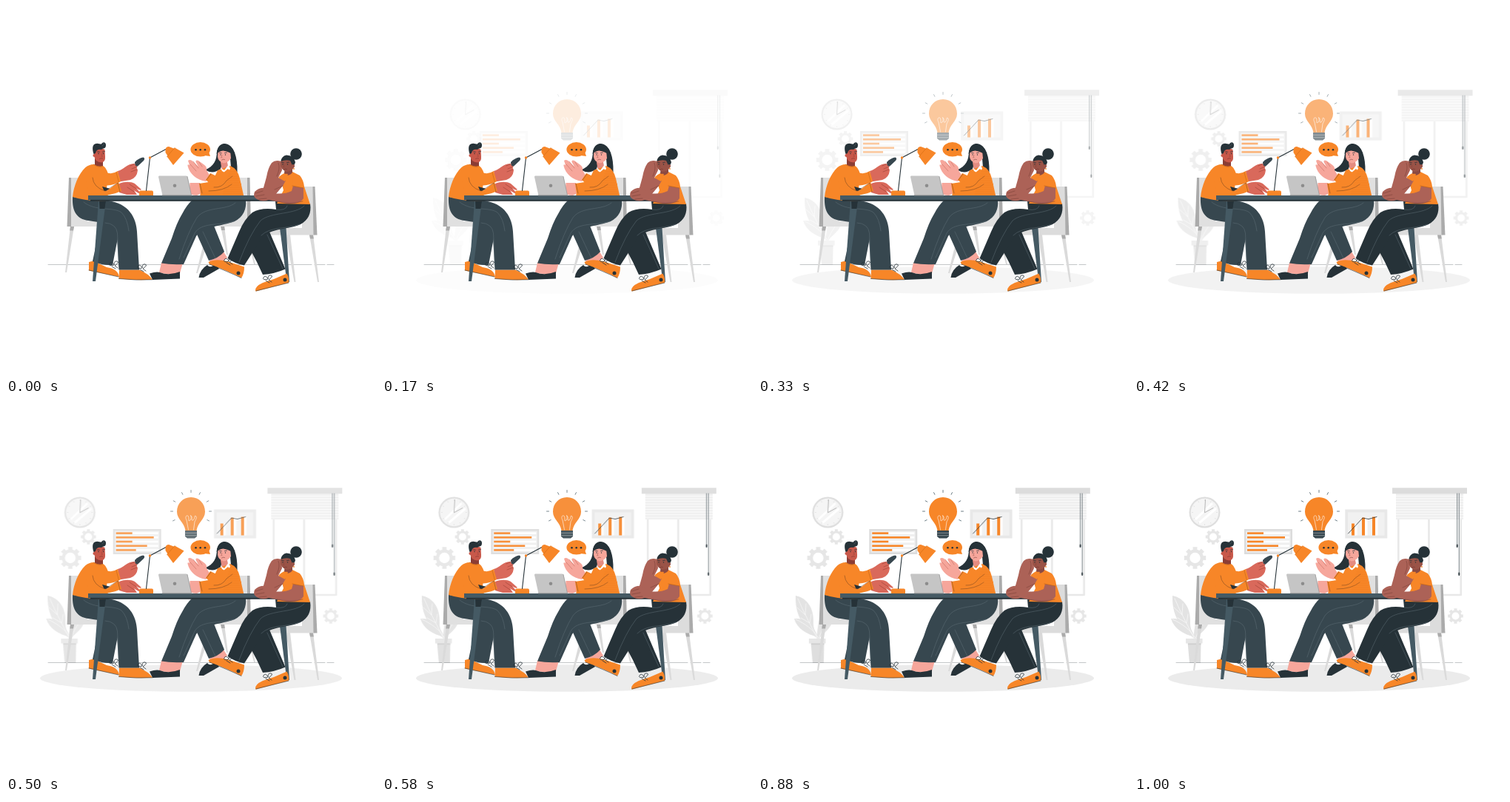
Recreate the animation shown at these times as an HTML page with a canvas. Size 500x500 px, loop 1040 ms.

```html
<!DOCTYPE html>
<html lang="en">
<head>
<meta charset="utf-8">
<title>Team meeting</title>
<style>
html, body { margin: 0; width: 100%; height: 100%; overflow: hidden; background: #fff; }
canvas { display: block; width: 500px; height: 500px; }
</style>
</head>
<body>
<canvas id="stage"></canvas>
<script>
const LOOP = 1040, STEPS = 25, SLIDE = 20, SIZE = 500;
const scale = Math.max(1, window.devicePixelRatio || 1);
const ORANGE = '#f78628', INK = '#263238', SLATE = '#37474f', TABLE = '#455a64', SEAM = '#607078';
const MAN = '#d9695b', MAN_FACE = '#c8584a', PINK = '#f6a69b', BROWN = '#ac6257', BROWN_FACE = '#9a5347';

function setup(cv) {
  cv.width = cv.height = Math.round(SIZE * scale);
  const c = cv.getContext('2d');
  c.scale(scale, scale);
  c.lineCap = c.lineJoin = 'round';
  return c;
}

let g;
function layer(...parts) {
  const cv = document.createElement('canvas');
  g = setup(cv);
  parts.forEach(part => part());
  return cv;
}

function fill(d, color) { g.fillStyle = color; g.fill(new Path2D(d)); }
function line(d, color = INK, w = 0.7) {
  g.strokeStyle = color;
  g.lineWidth = w;
  g.stroke(new Path2D(d));
}
function box(x, y, w, h, color) { g.fillStyle = color; g.fillRect(x, y, w, h); }
function oval(x, y, rx, ry, color) {
  g.fillStyle = color;
  g.beginPath();
  g.ellipse(x, y, rx, ry, 0, 0, 7);
  g.fill();
}
function dot(x, y, r, color) { oval(x, y, r, r, color); }

/* ---------- background ---------- */

function floor() { oval(250, 370.5, 204, 18.3, '#ebebeb'); }

function bulb() {
  fill('M250 126C239 126 231 134.500 231 145.500C231 156 241 160 242.500 171H257.500C259 160 269 156 269 145.500C269 134.500 261 126 250 126Z', ORANGE);
  line('M246.500 170L244 157C241 152 245 149 246.500 152C248 157 245 159 249 157C252 153 248 149 250 151C253 154 249 158 253 157C256 154 254 149 257 152C258 154 256 157 255 159L253.500 170', '#fff', 0.6);
  fill('M242 171H258V179L255 181.500H245L242 179Z', SLATE);
  line('M242 174.300H258M242 177.700H258', '#b0bbc0', 0.6);
  const angles = [-90, -63, -117, -30, -150, 0, 180, 27, 153];
  for (const a of angles) {
    const t = a * Math.PI / 180, x = Math.cos(t), y = Math.sin(t);
    line(`M${250 + x * 24.5} ${145 + y * 25.5}L${250 + x * 27.5} ${145 + y * 28.5}`, TABLE, 0.8);
  }
}

function gear(x, y, r) {
  const teeth = 8;
  g.fillStyle = '#e6e6e6';
  g.beginPath();
  for (let i = 0; i < teeth; i++) {
    const a = i * Math.PI * 2 / teeth;
    for (const [da, k] of [[-0.25, 0.77], [-0.2, 1], [0.2, 1], [0.25, 0.77]]) {
      g.lineTo(x + r * k * Math.cos(a + da), y + r * k * Math.sin(a + da));
    }
  }
  g.closePath();
  g.moveTo(x + r * 0.48, y);
  g.arc(x, y, r * 0.48, 0, 7);
  g.fill('evenodd');
}

function clock() {
  dot(95.5, 146.5, 21, '#dedede');
  dot(95.5, 146.5, 18.8, '#f5f5f5');
  line('M84 155L105 135M89 160L110 142', '#fff', 3);
  for (let i = 0; i < 12; i++) {
    const a = i * Math.PI / 6, x = Math.cos(a), y = Math.sin(a);
    line(`M${95.5 + 16 * x} ${146.5 + 16 * y}L${95.5 + 17 * x} ${146.5 + 17 * y}`, '#d5d5d5', 0.6);
  }
  line('M96.500 129.500L95.500 146.800L107 140.500', '#b5b5b5', 1);
}

function plant() {
  const leaf = '#e3e3e3', vein = '#f8f8f8';
  fill('M52 259C67 262 77 275 76 296C76 303 79 311 82 318C68 303 51 293 52 259Z', leaf);
  fill('M50 290C62 289 76 296 82 315C67 311 54 304 50 290Z', leaf);
  fill('M83 317C82 303 87 291 102 288C103 300 94 306 83 317Z', leaf);
  fill('M81 318C80 301 86 286 91 263C96 285 91 303 84 318Z', leaf);
  line('M55 263C62 280 73 300 82 318M54 275L65 285L66 270M59 289L71 296L73 284M52 291C65 297 75 304 82 315M83 317C87 306 94 295 101 289', vein, 0.8);
  fill('M72.500 322H90.500L90 350H75Z', '#dedede');
  box(70, 317, 22.500, 6.500, '#e6e6e6');
  box(73, 323.500, 17.500, 1.800, '#cfcfcf');
}

function blinds() {
  line('M357.300 155V258H441.800V155M398.500 155V258', '#e8e8e8', 2.6);
  box(354, 121, 91, 35, '#efefef');
  for (let y = 124; y < 156; y += 3.6) box(354, y, 91, 0.7, '#fff');
  box(349, 113.3, 101, 8, '#dcdcdc');
  line('M436.700 121V192M439.300 121V230', '#6c777c', 0.9);
  line('M436.700 190.500V193M439.300 228.500V231', INK, 1.8);
}

function board() {
  box(149, 169, 65, 34, '#dcdcdc');
  box(151.5, 171.5, 60, 29, '#efefef');
  [22, 51, 22, 42, 27].forEach((w, i) => {
    const y = 173.3 + i * 5.7;
    box(153, y, 57, 2.6, '#fff');
    box(153, y, w, 2.6, ORANGE);
  });
}

function chart() {
  box(285.300, 142.500, 57, 39, '#e8e8e8');
  box(289, 146.300, 49.500, 31.500, '#f1f1f1');
  [[294, 16], [308, 24], [322, 25]].forEach(([x, h]) => {
    box(x + 4, 177.500 - h, 3.500, h, '#fff');
    box(x, 177.500 - h, 4, h, ORANGE);
  });
  line('M289.500 175L309 154L317 155.500L328 152.500', INK, 0.8);
}

/* ---------- furniture ---------- */

function chairs() {
  const leg = '#dadada', side = '#ababab', seat = '#e0e0e0';
  line('M57 349.500H413M417 349.500H431M434 349.500H443', INK, 0.28);

  fill('M87 298H92L82 360H80Z', leg);
  fill('M87 298H92L91 303.500H86.200Z', side);
  fill('M86 232H110V291H128V298H86Z', seat);
  fill('M85 232H88V298H82.500Z', side);

  fill('M266 325L270 327L259 361H257Z', leg);
  fill('M290 297H295L300 336H298ZM326 297H322L335 349H337Z', leg);
  fill('M290 297H295L295.800 303H291Z', side);
  fill('M302 232H327V298H287V291H302Z', seat);
  fill('M326 232H329.500L331 297.500H326Z', side);

  fill('M378 309H384L391.500 373H389.500ZM410 309H415L423 373H421Z', leg);
  fill('M410 309H415L415.800 314.500H411Z', side);
  fill('M400 244H417V309.500H357V300H400Z', '#dcdcdc');
  fill('M414.500 244H417.500L420.500 309.500H415.500Z', side);
}

function tableBack() { fill('M370 300H378.500L383 373H379.500Z', TABLE); }

function table() {
  fill('M125 264H135L121 372H117Z', TABLE);
  fill('M126 264H135L133.500 274H126.500Z', INK);
  box(111, 256, 256, 6, TABLE);
  box(114, 261.8, 252, 2, INK);
}

function lamp() {
  fill('M180 256V251.500Q180 249.500 182 249.500H197Q199 249.500 199 251.500V256Z', ORANGE);
  line('M189.500 249.500L194.500 205L218 192.500', INK, 1.1);
  dot(194.5, 205, 1.7, ORANGE);
  fill('M215.500 194Q216 190 220 190L228 193L219 203.500L215.500 198Z', ORANGE);
  fill('M228 191.500L240.500 198.500L226 215L217.500 203.500Z', ORANGE);
  line('M217.500 203.500L228 191.500', '#c9650f', 0.5);
}

function laptop() {
  fill('M207 229.500H243.500Q245 229.500 245.500 231L250.500 256H211.500L206 231Q206 229.500 207 229.500Z', '#c5c5c5');
  line('M245 230.500L250.500 255.500', '#9a9a9a', 0.8);
  box(211, 255, 40, 1.3, '#a5a5a5');
  dot(228, 242.8, 2.3, '#8c8c8c');
}

function bubble() {
  oval(262.700, 193.800, 13.300, 9.700, ORANGE);
  fill('M268 202L276 203L274 197Z', ORANGE);
  [256.500, 262.700, 269].forEach(x => dot(x, 194.300, 1.300, INK));
}

/* ---------- people ---------- */

function laces(x, y) {
  line(`M${x} ${y}q-4 -5 -6 -1t6 2q0 -6 4 -5t-3 6l4 3m-8 -2l5 3`, INK, 0.8);
}

function face(x, y, dir) {
  dot(x - 3, y, 0.7, INK);
  dot(x + 3.5, y, 0.7, INK);
  line(`M${x - 4.5} ${y - 2.500}l2.800 .300M${x + 2.500} ${y - 2.300}l3 -.600`, INK, 0.7);
  line(`M${x + dir} ${y + 0.500}l${dir * 1.300} 3.300h${-dir * 1.300}`, '#803c34', 0.4);
  line(`M${x - 1.500} ${y + 7}q2 -1.500 4 -.500`, '#6d2f2a', 0.5);
}

function man() {
  // far leg and shoe
  fill('M112 346L118 344.500L136 353Q151 355 153 366L112 357.500Z', ORANGE);
  line('M112 357L152 366', INK, 0.6);
  fill('M130 284L155 293L144 350Q130 351 117 345Z', SLATE);
  // near leg and shoe
  fill('M153 356.500H180Q193 362 198 369.800Q174 371 152.500 368.500Z', ORANGE);
  line('M152.500 368.500Q176 371 198 369.800', INK, 0.6);
  fill('M90 258C89 278 96 288 111 290Q122 292 136 293Q148 294 149.500 304L152.500 356.500H180L177 305C176 286 166 267 138 263Z', SLATE);
  line('M105 265C121 278 145 271 156 279Q164 287 166 304M134 293Q149 294 150.500 307L152.500 352', SEAM, 0.5);
  laces(146, 349);
  laces(184, 353);
  // neck, head
  fill('M120 206H131V216Q126 220 120 216Z', '#8b3d35');
  fill('M119 194Q126 190 133.500 194L134 204Q134.500 210.500 129 211.500Q120 211 119 202Z', MAN_FACE);
  dot(119.5, 202, 2.1, MAN_FACE);
  fill('M118.500 200C116.500 194 116.500 188 120 186.500C124 184.500 127 187 129 186.500C131 183 135 184 135 188C135 193.500 131 191.500 129 194Q122 193 121 199Z', INK);
  line('M130 189Q133 188 132 185', SEAM, 0.5);
  face(128, 199.5, 1);
  // torso
  fill('M118.500 214Q112 214 107 218.500C98 227 91.500 243 90 258Q112 265 139 263L136 247L138 227Q135 217 130.500 216Q125 218 118.500 214Z', ORANGE);
  line('M118.500 214Q125 219 131 216.500', '#bf6418', 0.7);
  // upper hand with phone
  fill('M151 223C158 222 163 213 173 213L177 216Q176 219 178 222Q177 232 168 235L153 237.500Z', MAN);
  fill('M134 224Q142 229 151 223L155 237Q143 244 132 242Z', ORANGE);
  line('M149 225L152.500 238', '#bf6418', 0.6);
  fill('M174 211Q179 205.500 185.500 204.500Q188.500 206 186 209L178 216.500Q174 217 174 211Z', SLATE);
  line('M168 216L176 212.500M170 220L177.500 217M169 224L177 221', '#8c382f', 0.5);
  // lower hand
  fill('M153 240C160 237 169 237 174 240L183 248Q181 250 176 246L182 253Q179 254 173 249L177 255H163L153 252Z', MAN);
  line('M167 241L176 247M164 245L173 251', '#8c382f', 0.5);
  fill('M130 244L141 247L133 251Z', INK);
  fill('M113 230Q116 249 136 250L152 238L156 250Q143 256 122 257Q108 252 109 235Z', ORANGE);
  line('M117 232Q118 245 134 250L151 239L154 251', '#6c4021', 0.5);
}

function woman() {
  // far leg
  fill('M275 344L294 332L299 340L282 354Z', PINK);
  fill('M260.500 367Q262 356 272 350Q276 355 283 348.500L288 355L267 367Z', INK);
  fill('M255 302L281 297L295 332Q287 341 274 344Z', SLATE);
  line('M266 305L283 341', SEAM, 0.5);
  // near leg
  fill('M210 347H239L235 361Q220 364 207 360Z', PINK);
  fill('M194 361.500Q203 358.500 208 360Q220 365 235 359V368.500L198 370Z', INK);
  fill('M252 262H324Q326 282 309 291C291 298 267 297 257 311L240 349Q223 350 210 347.500L224 314Q231 292 238 281Q244 269 252 262Z', SLATE);
  line('M310 266C297 277 270 270 258 286Q246 305 234 342M308 291C287 297 264 292 255 307L240 340', SEAM, 0.5);
  // hair behind, neck, torso
  fill('M285 196C285 208 281 217 269 221.500Q280 228 290 220L294 206H303L304 218L312.500 225Q313 209 309 198Q304 186 295 186Q287 187 285 196Z', INK);
  fill('M290 211H299L301 221L292 224Z', '#e58c81');
  fill('M286 222L303 216Q313 220 316 233L322 260H262L263 248L280 235Z', ORANGE);
  fill('M290 219L295 222L301 214L303 220L297 226L292 223Z', '#fff');
  // face and fringe
  fill('M286.500 195Q295 190 303 195L304 206Q299 212.500 294 212.500Q287 210.500 286 204Z', PINK);
  fill('M284.500 200Q286 187 295 186Q305 187 309 199L308 214L304.500 211L304 199Q299 196 293.500 195.500Q288 196 284.500 200Z', INK);
  face(293, 201, -1);
  // hands
  fill('M248.500 239L247.500 252Q249 256 258 256L264 253L262 239Z', PINK);
  fill('M270 237C258 235 248 227 245.500 216Q245 213 248 215L246 209Q249 206.500 252.500 210L260 217L256.500 211Q256 207.500 260 209L267 214Q272 217 271 222L276 230Z', PINK);
  line('M249 214L257 223M253 210L260 219M261 211L265 217', '#b86257', 0.5);
  // sleeves
  fill('M270 235L276 226L287 231L300 220L309 230C301 244 289 248 281 245Z', ORANGE);
  fill('M261 240L280 237L299 236L318 240L316 250Q288 258 263 254Z', ORANGE);
  line('M271 235L277 227M281 245Q292 246 298 236L306 230M262 240L265 253M274 250Q294 250 305 241', '#6c4021', 0.5);
  for (let y = 224; y < 255; y += 3) line(`M${302 - (y - 224) * 0.3} ${y}H${312 + (y - 224) * 0.2}`, '#e8761b', 0.35);
}

function thinker() {
  // far leg and shoe
  fill('M337 385Q336 379 347 374L362 369L379.500 361.500Q383 368 382 374L338 385.500Z', ORANGE);
  line('M338 385L382 374', INK, 0.6);
  dot(377, 370, 2.5, INK);
  fill('M330 329L341 303L356 305L377.500 355.500Q363 362 347 363Q339 345 330 329Z', INK);
  line('M353 309L374 355', SEAM, 0.5);
  laces(354, 368);
  // near leg and shoe
  fill('M273.500 346Q283 341 299 345L322 352.500Q322 362 318 367.500Q300 358 275 349Z', ORANGE);
  line('M275 349Q300 359 318 367.500', INK, 0.6);
  dot(314, 361, 2.5, INK);
  fill('M364 264L411 267Q414 286 398 295C383 302 357 300 346 313L322 350.500Q309 348 299.500 341L315 305Q322 288 333 279Q345 272 365 275Z', INK);
  line('M403 270C392 282 358 278 344 290Q329 309 315 346M365 275Q378 277 380 270M397 295C376 302 357 298 345 310', SEAM, 0.5);
  laces(301, 344);
  // torso
  fill('M369 231Q375 225 385 223L397 229Q402 235 403 244L411 268L366 267L375 249L372 237Z', ORANGE);
  fill('M377 217H387V225Q381 232 376 226Z', '#8b4a42');
  // propped arm
  fill('M372 210Q364 207 359 212Q354 219 352 231Q349 242 347 249L364 255L374 243L378 236L368 232L373 222Z', BROWN);
  line('M368 212Q371 219 366 230M363 248L374 243', '#733a33', 0.5);
  fill('M368 232Q374 226 381 227L377 237Z', ORANGE);
  // head
  fill('M372 207Q380 203 388 208L390 217Q386 224 379 224Q371 221 371 214Z', BROWN_FACE);
  fill('M371.500 210Q372 203 379 201.500Q389 202 391 211Q390 215.500 387 215.500L384 209Q378 207 371.500 210Z', INK);
  dot(392, 200, 7.8, INK);
  dot(388, 216, 2, BROWN_FACE);
  dot(389, 220, 0.9, ORANGE);
  face(377, 214, -1);
  // resting arm
  fill('M388 243L402 245L402 260Q398 268 380 267L355 262Q346 265 339 261Q333 258 336 251Q342 245 351 246L362 253Q376 255 386 250Z', BROWN);
  line('M337 253L347 250M338 257L349 255M342 261L352 260M366 264Q384 269 401 264', '#733a33', 0.5);
  fill('M389 229Q399 230 403 246L386 243Z', ORANGE);
  line('M387 243L402 246', '#bf6418', 0.7);
}

/* ---------- playback ---------- */

const still = layer(floor, bulb);
const leftward = layer(clock, () => gear(107, 179.5, 10.5), () => gear(82.5, 208, 15),
  () => gear(434.5, 286.5, 10.5), plant, blinds);
const rightward = layer(board, chart);
const scene = layer(chairs, tableBack, woman, man, table, lamp, laptop, bubble, thinker);

const ctx = setup(document.getElementById('stage'));

// cubic-bezier(.36, -.01, .5, 1.38), solved by bisection
function ease(x) {
  const curve = (a, b, s) => 3 * a * s * (1 - s) ** 2 + 3 * b * s * s * (1 - s) + s ** 3;
  let lo = 0, hi = 1;
  for (let i = 0; i < 24; i++) {
    const mid = (lo + hi) / 2;
    if (curve(0.36, 0.5, mid) < x) lo = mid; else hi = mid;
  }
  return curve(-0.01, 1.38, lo);
}

function draw(t) {
  const step = Math.min(STEPS - 1, Math.floor((t + 4) * 24 / 1000));
  const p = step < 2 ? 0 : step === STEPS - 1 ? 1 : ease((step + 1) / STEPS);
  const shift = SLIDE * (1 - p);
  const put = (img, dx) => ctx.drawImage(img, dx, 0, SIZE, SIZE);
  ctx.globalAlpha = 1;
  ctx.fillStyle = '#fff';
  ctx.fillRect(0, 0, SIZE, SIZE);
  ctx.globalAlpha = Math.min(1, Math.max(0, p));
  put(still, 0);
  put(leftward, shift);
  put(rightward, -shift);
  ctx.globalAlpha = 1;
  put(scene, 0);
}

const start = performance.now();
function tick() {
  draw((performance.now() - start) % LOOP);
  requestAnimationFrame(tick);
}
tick();
</script>
</body>
</html>
```
